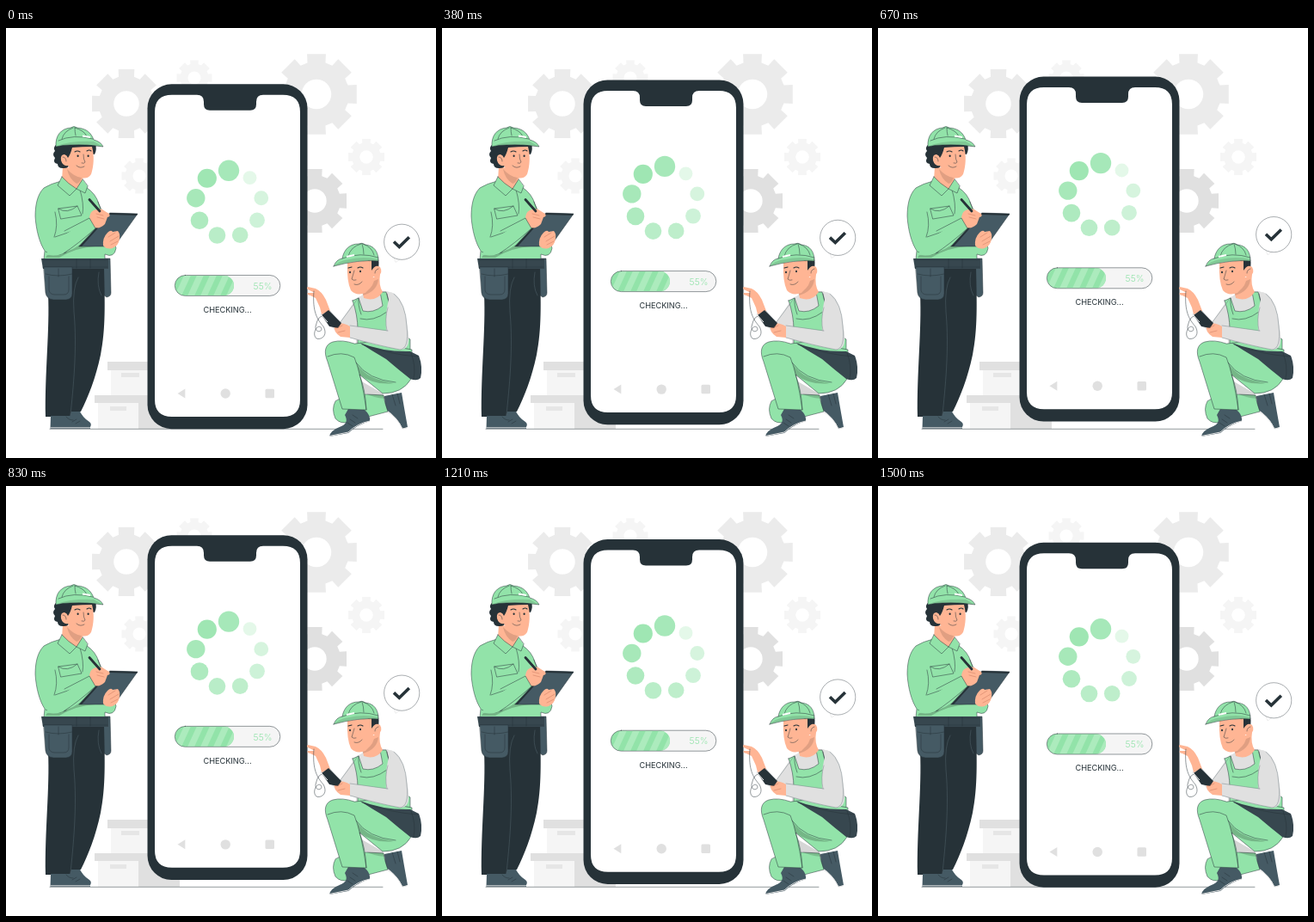
Animation, 500 px wide and 500 px high, one loop 1.54 s. Source, as an HTML page:

```html
<!DOCTYPE html>
<html lang="en">
<head>
<meta charset="utf-8">
<title>Checking</title>
<style>
html, body { margin: 0; width: 100%; height: 100%; overflow: hidden; background: #fff; }
svg { display: block; width: 100vw; height: 100vh; }
.g { fill: #92e3a9; }
.d { fill: #263238; }
.m { fill: #455a64; }
.s { fill: #ffb594; }
.w { fill: #e0e0e0; }
.l { fill: none; }
.o, .l { stroke: #263238; stroke-width: .5; stroke-linecap: round; stroke-linejoin: round; }
.f { stroke: #c9785f; }
.b { stroke-width: 1.1; }
.sh { fill: #000; opacity: .2; }
text { font-family: Inter, "Open Sans", sans-serif; text-anchor: middle; }
</style>
</head>
<body>
<svg viewBox="0 0 500 500" xmlns="http://www.w3.org/2000/svg">
  <g id="gears" fill-rule="evenodd"></g>

  <g id="boxes">
    <path fill="#f5f5f5" d="M122 398h93v29h-93zM107 436h48v30h-48z"/>
    <path class="w" d="M118 388h97v10h-97zM103 427h99v9h-99zM154 427h48v39h-48z"/>
    <path fill="#e6e6e6" d="M134 401h21v5h-21zM121 440h19v5h-19z"/>
  </g>
  <path class="l" d="M51 466.300H438"/>

  <g id="phone">
    <rect class="d" x="164.500" y="65.800" width="186" height="400.900" rx="28"/>
    <path fill="#fff" d="M192 78.300H222q8 0 8 8v3q0 7 7 7h47q7 0 7-7v-3q0-8 8-8h23q20 0 20 20V432.500q0 20-20 20H193q-20 0-20-20V98.300q0-20 20-20z"/>
    <g id="dots"></g>
    <rect x="196.300" y="288" width="122.500" height="24" rx="12" fill="#f5f5f5"/>
    <clipPath id="fill"><rect x="196.500" y="288.200" width="68.500" height="23.600" rx="11.800"/></clipPath>
    <g clip-path="url(#fill)">
      <path class="g" d="M196 288h70v24h-70z"/>
      <path id="stripes" fill="#acebbd"/>
    </g>
    <rect class="l" x="196.300" y="288" width="122.500" height="24" rx="12"/>
    <text x="298.500" y="304.200" font-size="10.400" font-weight="300" fill="#92e3a9">55%</text>
    <text x="257.500" y="331.300" font-size="9.200" fill="#263238">CHECKING...</text>
    <path class="w" d="M199.500 425.500l8.800-5.500v11z"/>
    <circle class="w" cx="255.200" cy="425.500" r="5.700"/>
    <rect class="w" x="301.500" y="420.200" width="10.500" height="10.500" rx="1.500"/>
  </g>

  <g id="bubble">
    <path d="M451 267.500L453 273L458 269.500" fill="#fff" stroke="#ddd" stroke-width=".5"/>
    <circle cx="460.200" cy="249.300" r="20.600" fill="#fff" stroke="#263238" stroke-width=".4"/>
    <path d="M451 249l6.300 6 11.500-11.300" fill="none" stroke="#263238" stroke-width="3.600"/>
  </g>

  <g id="standing">
    <path class="m o" d="M112 268H121L122 308Q122 312 117 313L113 310z"/>
    <path class="m" d="M76 441L85 444Q89 453 97 458Q100 460 98 464L80 464L70 454z"/>
    <path class="d" d="M49 278H114C115 320 116 350 110 380C104 408 96 428 87 446L76 446L74 452H46C45 402 51 350 49 310z"/>
    <path class="l" style="stroke:#53656d" d="M84 290Q77 302 79 330C83 373 78 420 75 450M108 284Q105 300 111 311"/>
    <path class="m" d="M52 451H75Q80 458 89 459.500Q97 461 98 466H51.500z"/>
    <path d="M51.500 464.800H97" stroke="#e0e0e0" fill="none"/>
    <path class="l" d="M70 452q3 4 8 4M77 458l5-3M81 460l5-3"/>

    <path class="g o" d="M64 178Q52 181 44 186C36 194 34 207 34 219C35 235 39 250 45 259L44 269H115V263Q126 268 128 256L121 232L108 205Q105 193 93 185L87 176z"/>
    <path class="sh" d="M48 264Q69 264 88 251L104 254Q82 255 62 267H46z"/>
    <path class="l" d="M57 214Q61 230 56 243M57 243Q72 238 86 233M46 260Q54 267 70 261M107 202Q112 213 111 228M86 188Q91 205 89 216M61 210L83 207L88 218L64 222zM61 210Q71 217 83 207"/>
    <path class="s" d="M66 160L91 169Q88 181 83 187Q73 185 65 178z"/>
    <path class="sh" style="opacity:.12" d="M71 164Q79 173 88 174Q86 180 82 181Q73 175 71 164z"/>
    <path class="g o" d="M65 173L60 183L74 195L82 187Q72 181 65 173zM89 176L82 187L92 192L95 184z"/>
    <path class="d" d="M59 135Q54 139 57 143Q53 147 57 151Q54 157 60 158Q60 163 66 163Q73 164 76 156L80 142L103 147Q106 141 104 134z"/>
    <path class="s" d="M77 139Q89 138 100 138C103 149 102 161 99 170Q95 176 88 174Q76 171 72 160Q66 161 64 154Q63 147 68 147Q71 148 72 151Q75 147 77 139z"/>
    <path class="l" d="M66 150q4 0 4 5M90 147Q90 153 92 156Q91 158 88 157M82 160Q86 164 91 161"/>
    <path class="l b" d="M80 144q3-2 6 0M94 143q3-2 5 0"/>
    <path class="d" d="M82.500 148.700a1.100 1.300 0 1 0 2.200 0a1.100 1.300 0 1 0-2.200 0M94.500 148.700a1.100 1.300 0 1 0 2.200 0a1.100 1.300 0 1 0-2.200 0"/>
    <path class="g o" d="M58 138C57 125 64 117 75 116Q79 113 83 116C94 117 99 122 102 130Q110 132 113 138Q95 135 75 136Q66 136 58 138z"/>
    <path class="sh" style="opacity:.12" d="M59 137Q75 131 102 132L113 138Q87 134 59 137z"/>
    <path class="l" d="M61 131Q78 123 101 129M78 116Q67 120 65 129M80 116Q91 119 94 126M80 116Q80 121 81 125"/>
    <path d="M89 125.500l9 1.500" stroke="#fff" stroke-width="2"/>

    <path class="m o" d="M121 215L153 216L126 254L85 254z"/>
    <path class="d" d="M121 215L153 216L152 218L121 217L88 254H85z"/>
    <path class="s" d="M97 220Q98 212 105 211Q111 209 115 213L120 216Q122 219 118 220L115 228Q108 235 101 231z"/>
    <path class="l f" d="M105 216L113 218M106 220L114 222"/>
    <path d="M97 199.500L109 213" stroke="#263238" stroke-width="2.800" stroke-linecap="round"/>
    <path class="g" d="M62 245L97 221L104 233L67 262Q54 267 47 262z"/>
    <path class="l" d="M68 236L97 221L104 233Q84 251 67 262"/>
    <path class="s" d="M113 253Q112 244 118 238Q122 234 124 237L130 236Q133 239 132 245Q131 253 124 256Q117 258 113 253z"/>
    <path class="l f" d="M119 243L127 238M121 248L131 242M122 252L130 248"/>

    <path d="M41 268H119V280H43z" fill="#37474f"/>
    <path class="l" d="M43 270H118M43 278H118M82 269V279M98 269V279"/>
    <path class="m o" d="M44 278H77V309Q77 315 70 316H55Q47 315 46 308z"/>
    <path class="l" d="M46 286Q60 290 77 286M50 289V305Q51 310 57 310H67Q73 310 73 304V289M61 280V289"/>
  </g>

  <g id="kneeling">
    <path class="m" d="M440 428L460 424Q463 442 467 464L461 466Q456 453 441 443z"/>
    <path d="M442 445Q455 453 461 466L466 465" stroke="#e0e0e0" fill="none"/>
    <path class="l" d="M449 426l4 13M455 425l3 12"/>
    <path class="g o" d="M383 434Q378 443 383 454Q389 461 398 458L444 446Q440 435 439 427L400 425z"/>
    <path class="sh" style="opacity:.16" d="M412 410L438 425L441 431Q427 430 416 424z"/>
    <path class="m" d="M398 443L417 444Q424 450 423 457Q409 461 398 471L376 475Q377 468 390 463Q399 459 394 450z"/>
    <path d="M376 474.500L398 470Q408 460 423 457" stroke="#e0e0e0" fill="none"/>
    <path class="l" d="M397 459l6 4M400 455l6 4M403 450l6 4"/>

    <path class="w" d="M365 333L374 328L387 344L408 314Q423 304 443 306C459 311 465 326 467 349L470 372L452 384H410L405 352Q393 358 383 352z"/>
    <path class="g o" d="M403 317L410 314L415 329Q427 332 438 323L435 307L442 307Q446 323 455 344Q463 359 470 362V398H409V351Q409 334 403 317z"/>
    <path class="l" d="M412 338Q427 342 443 330M410 314Q409 322 413 333M443 309Q444 320 450 330"/>
    <path class="g o" d="M405 367Q391 362 380 365C371 368 369 376 374 388L391 443L419 444Q418 421 411 403L438 425Q461 425 471 408L472 374L424 365z"/>
    <path class="sh" d="M408 391Q420 409 452 413Q428 416 411 403z"/>
    <path class="l" d="M374 382Q390 375 405 383Q413 402 419 444M407 389Q421 409 453 412"/>
    <path d="M411 366Q440 377 470 376L480 381Q485 394 482 407Q478 411 470 408Q456 397 442 385Q425 375 411 366z" fill="#37474f"/>
    <path class="l" d="M414 368Q447 380 479 382M471 378Q477 393 474 408"/>
    <path class="w" d="M447 307C459 311 464 325 466 345C470 365 469 374 458 374Q430 369 399 360L400 346L442 352Q441 333 444 320z"/>
    <path class="l" style="stroke:#78858b" d="M444 325Q440 339 443 352M400 346L444 352M400 360Q432 369 458 374Q469 373 466 347Q465 320 451 309M408 316Q398 330 388 343L376 328"/>
    <path class="s" d="M382 346Q388 340 400 347V360L389 359Q380 353 382 346z"/>
    <path class="s" d="M377 329L372 316Q367 306 360 303L351 301Q348 303 353 305L359 308L351 308Q349 310 354 311L360 314L365 325L367 333z"/>
    <path class="l" d="M358 306C356 330 362 339 369 347C375 358 366 363 361 361C355 356 362 344 366 348C370 353 359 356 360 347Q363 333 370 335"/>
    <path class="d" d="M367 334L375 328L390 343L386 349L376 347z"/>
    <path d="M366 333l8 9" stroke="#fff" stroke-width="1"/>
    <path class="l f" d="M384 349L391 346M386 354L394 352"/>

    <path class="s" d="M415 296L435 286Q433 299 438 307Q430 319 416 314Q414 307 415 296z"/>
    <path class="sh" style="opacity:.12" d="M414 308Q425 305 428 294L433 292Q432 306 415 311z"/>
    <path class="d" d="M421 270L433 268Q435 279 430 289L424 286z"/>
    <path class="s" d="M397 273L425 270V282Q430 274 435 278Q439 285 432 289L427 289Q426 301 418 308Q407 312 401 305Q396 294 397 273z"/>
    <path class="l" d="M405 282Q403 289 402 292Q404 294 407 293M405 298Q410 300 414 295M433 280q-4 1-4 5"/>
    <path class="l b" d="M409 279q3-2 6 0M398 279l4-1"/>
    <path class="d" d="M399 284a1 1.200 0 1 0 2 0a1 1.200 0 1 0-2 0M411 283a1 1.200 0 1 0 2 0a1 1.200 0 1 0-2 0"/>
    <path class="g o" d="M381 277Q384 269 391 268C393 257 400 251 410 251Q414 249 418 252C428 253 433 260 433 271Q410 269 381 277z"/>
    <path class="sh" style="opacity:.12" d="M381 277Q386 271 399 269Q416 265 433 269V271Q406 269 381 277z"/>
    <path class="l" d="M391 268Q412 260 433 267M413 251Q401 254 398 265M414 251Q416 257 416 263M415 251Q426 255 428 264"/>
    <path d="M396 266l9-2" stroke="#fff" stroke-width="2"/>
  </g>
</svg>
<script>
const $ = id => document.getElementById(id);

function add(parent, tag, attrs) {
  const el = document.createElementNS("http://www.w3.org/2000/svg", tag);
  for (const k in attrs) el.setAttribute(k, attrs[k]);
  parent.append(el);
}

function gear(cx, cy, r, fill) {
  const pts = [];
  const at = (a, q) => pts.push((cx + q * Math.cos(a)).toFixed(2) + " " + (cy + q * Math.sin(a)).toFixed(2));
  for (let i = 0; i < 8; i++) {
    const a = i * Math.PI / 4;
    at(a - .28, r * .79);
    at(a - .23, r);
    at(a + .23, r);
    at(a + .28, r * .79);
  }
  const h = r * .36;
  const hole = `M${cx - h} ${cy}a${h} ${h} 0 1 0 ${2 * h} 0a${h} ${h} 0 1 0 ${-2 * h} 0z`;
  add($("gears"), "path", { d: "M" + pts.join("L") + "z" + hole, fill });
}

[[140, 88, 41, "#ebebeb"], [219, 58, 21, "#f5f5f5"], [361, 77, 48, "#ebebeb"],
 [359, 201, 38, "#e0e0e0"], [419, 150, 21.5, "#f5f5f5"], [155, 172, 21, "#f5f5f5"]]
  .forEach(g => gear(...g));

[[259, 166.3, 12.2, .82], [233.8, 175.3, 11.1, .88], [220.8, 198.3, 10.7, .81],
 [225, 224.3, 10.3, .74], [245.5, 241.5, 9.8, .64], [272.2, 241.3, 9.3, .6],
 [292, 224, 8.9, .46], [296.8, 198.3, 8.4, .38], [283.5, 174.7, 7.9, .25]]
  .forEach(([cx, cy, r, opacity]) => add($("dots"), "circle", { cx, cy, r, opacity, class: "g" }));

let bars = "";
for (let x = 196; x < 265; x += 15) bars += `M${x} 312l11-24h8l-11 24z`;
$("stripes").setAttribute("d", bars);

// 24 steps per second, each start rounded to 10 ms
const LOOP = 1540, STEPS = 37;
const start = k => Math.round(k * 25 / 6) * 10;

function draw(t) {
  t %= LOOP;
  let k = 0;
  while (k < STEPS - 1 && start(k + 1) <= t) k++;
  const u = (k + 1) % STEPS / STEPS;
  const y = -10 * (1 - Math.abs(2 * u - 1));
  for (const id of ["phone", "bubble"]) $(id).setAttribute("transform", `translate(0 ${y.toFixed(3)})`);
}

let t0;
function tick(now) {
  t0 ??= now;
  draw(now - t0);
  requestAnimationFrame(tick);
}
draw(0);
requestAnimationFrame(tick);
</script>
</body>
</html>
```
